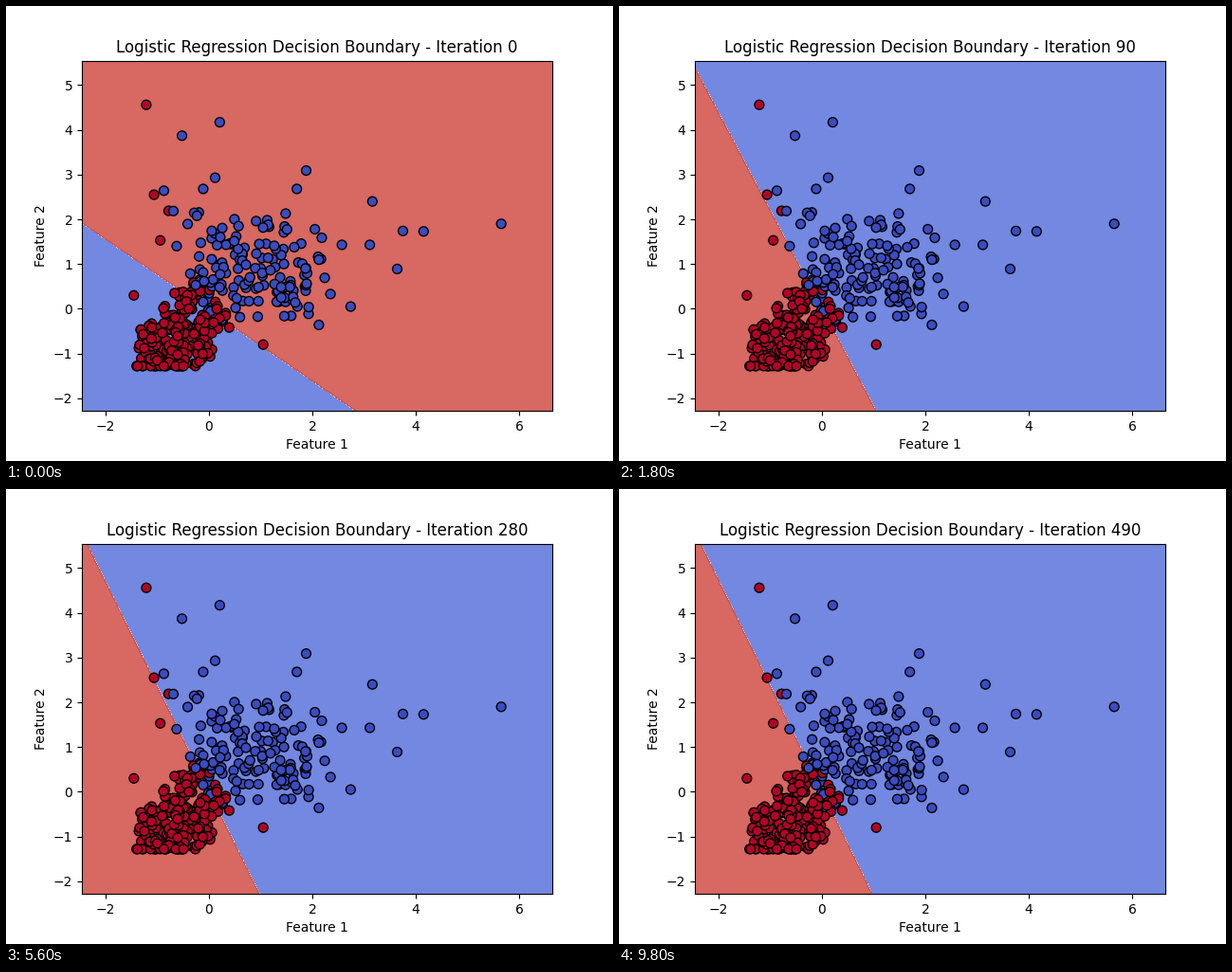
A matplotlib script that plays this animation: 640x480 px, repeating every 10000 ms.

```python
import numpy as np
import matplotlib.pyplot as plt
from matplotlib.animation import FuncAnimation

FRAMES, STEP_MS = 50, 200
XLIM, YLIM = (-2.455, 6.637), (-2.283, 5.548)
FLOOR = -1.28

# The isolated samples; everything else is drawn from seeded blobs.
FAR_RED = [(-1.21, 4.56), (-1.06, 2.55), (-0.78, 2.19), (-0.94, 1.53),
           (-1.45, 0.30), (1.05, -0.80)]
FAR_BLUE = [(-0.52, 3.87), (0.21, 4.17), (0.12, 2.93), (-0.11, 2.68),
            (-0.87, 2.64), (1.88, 3.09), (1.70, 2.68), (3.16, 2.40),
            (5.65, 1.90), (3.75, 1.74), (4.15, 1.73), (3.64, 0.89),
            (3.11, 1.43), (2.57, 1.43), (2.74, 0.05), (2.35, 0.33)]

rng = np.random.default_rng(7)


def blob(n, center, spread, keep):
    """n Gaussian samples inside the region where keep(x, y) holds."""
    x, y = rng.normal(center, spread, (40 * n, 2)).T
    inside = np.flatnonzero(keep(x, y))[:n]
    return np.column_stack([x, np.maximum(y, FLOOR)])[inside]


def core(x, y):
    return (-1.45 < x) & (x < 0.2) & (x - 1.1 < y) & (y < x + 1.2)


def tail(x, y):
    return (y < 1.05) & (y < x + 1.2) & (x < 0.3)


def fringe(x, y):
    return (0.1 < x) & (x < 0.6) & (-0.6 < y)


def right(x, y):
    return (-0.7 < y) & (y < 2.2) & (x < 2.3) & (y + 2 * x > -0.1)


red = np.vstack([
    FAR_RED,
    blob(215, (-0.58, -0.78), (0.42, 0.42), core),
    blob(45, (-0.40, 0.10), (0.27, 0.40), tail),
    blob(8, (0.30, -0.10), (0.20, 0.30), fringe),
])
blue = np.vstack([
    FAR_BLUE,
    blob(38, (0.05, 0.60), (0.32, 0.45), right),
    blob(62, (1.35, 0.45), (0.50, 0.38), right),
    blob(52, (0.70, 1.45), (0.80, 0.50), right),
])
pts = np.vstack([red, blue])
label = np.repeat([1, 0], [len(red), len(blue)])
order = rng.permutation(len(pts))

fig, ax = plt.subplots(figsize=(6.4, 4.8), dpi=100)
ax.set(xlabel="Feature 1", ylabel="Feature 2")
ax.scatter(*pts[order].T, c=label[order], s=50, cmap="coolwarm",
           edgecolors="k", zorder=2)

gx, gy = np.meshgrid(np.arange(XLIM[0], XLIM[1] + 0.01, 0.01),
                     np.arange(YLIM[0], YLIM[1] + 0.01, 0.01))
regions = None


def slope(k):
    """Steepness of the boundary, settling as the training goes on."""
    return 2.365 - 0.977 * np.exp(-0.0322 * k) - 0.30 * np.exp(-0.01 * k)


def classify(k):
    if k == 0:  # untrained weights: the classes are still swapped
        return gy + 0.793 * gx > -0.025
    return gy + slope(k) * gx < 0.005


def update(i):
    global regions
    k = 10 * i
    if regions is not None:
        regions.remove()
    regions = ax.contourf(gx, gy, classify(k).astype(float),
                          cmap="coolwarm", alpha=0.8, zorder=0)
    ax.set(xlim=XLIM, ylim=YLIM)
    ax.set_title(f"Logistic Regression Decision Boundary - Iteration {k}")


anim = FuncAnimation(fig, update, frames=FRAMES, interval=STEP_MS,
                     init_func=lambda: update(0), repeat=True, repeat_delay=0)
plt.show()
```
